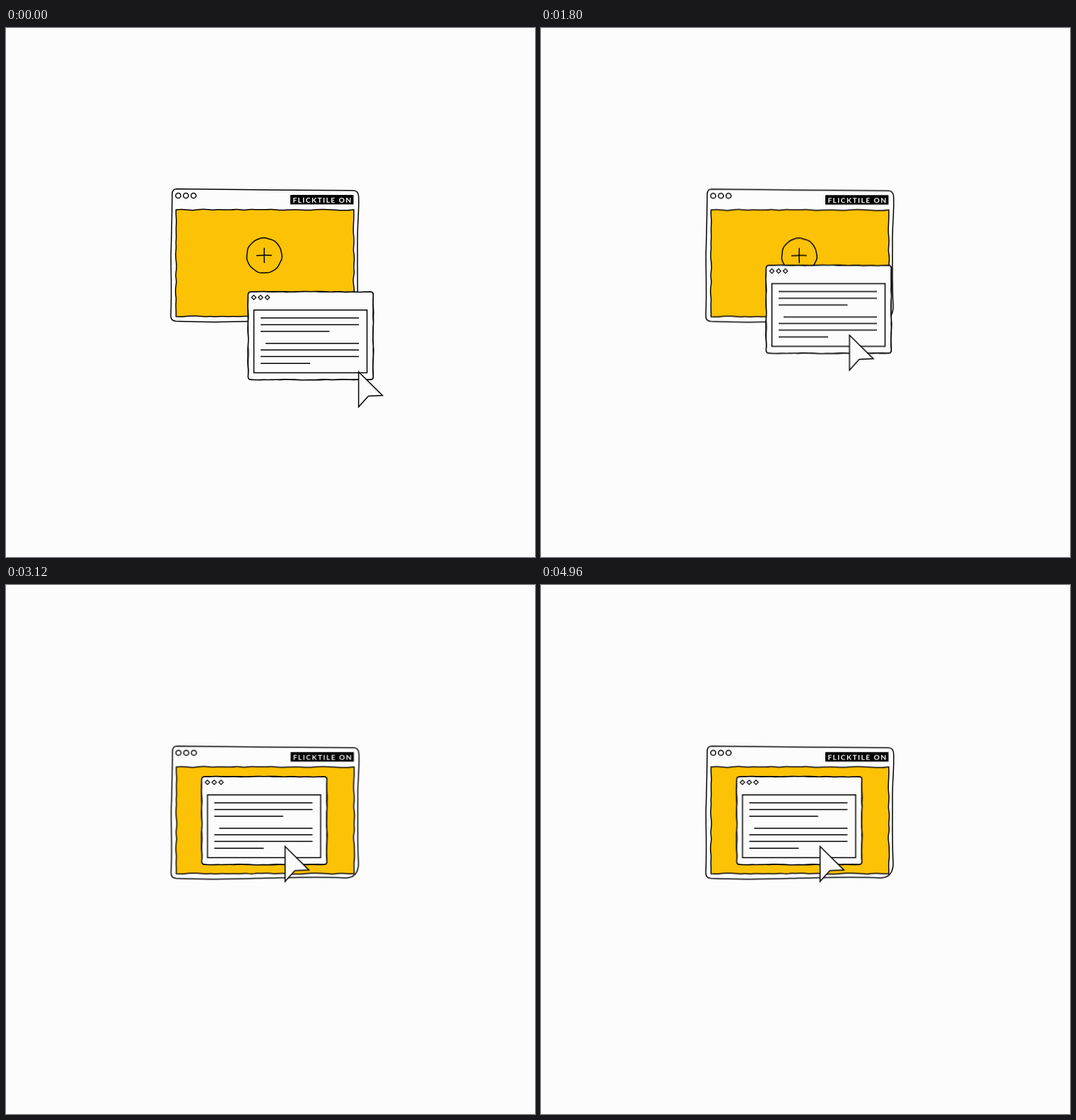
Write an HTML page that moves like this. It is 748x748 px and loops after 5000 ms.

```html
<!DOCTYPE html>
<html lang="en">
<head>
<meta charset="utf-8">
<title>Window drop</title>
<style>
  html, body { margin: 0; width: 100%; height: 100%; overflow: hidden; background: #fcfcfc; }
  svg { display: block; width: 100vw; height: 100vh; }
  .line { fill: none; stroke: #000; stroke-width: 1.5; }
  .paper { fill: #fcfcfc; }
  .thin { stroke-width: 1.2; }
  .tag { font: 700 10.3px Lato, sans-serif; letter-spacing: 1.4px; fill: #fff; }

  .sway, .drag, .reach { animation: 5s linear infinite; }
  .sway { animation-name: sway; }
  .drag { animation-name: drag; }
  .reach { animation-name: reach; }

  @keyframes sway {
    0%, 18.4% { transform: translate(0, 0); }
    36% { transform: translate(0, .3px); }
    46.4% { transform: translate(0, -.2px); }
    62.4% { transform: translate(.4px, .3px); }
    84.8%, 100% { transform: translate(0, .3px); }
  }
  @keyframes drag {
    0%, 33.6% { transform: translate(0, 0); animation-timing-function: cubic-bezier(.3, 1, .6, 1); }
    52.6%, 100% { transform: translate(-65.6px, -102px); }
  }
  @keyframes reach {
    0%, 18.4% { transform: translate(0, 0); animation-timing-function: cubic-bezier(.333, 1, .667, 1); }
    33.6%, 100% { transform: translate(-38.4px, -14.6px); }
  }
</style>
</head>
<body>
<svg viewBox="0 0 748 748">
  <g class="sway">
    <path class="line paper" d="M235 235Q235 228 241 227.6C320 228.2 410 229.8 491 229.7Q498.2 230 498.6 238C499.5 262 496.6 275 497 305C497 345 496.5 365 498 394Q497.5 413.5 480 414C440 411.5 400 413.5 365 414.2C325 415.5 295 417 240 414.6Q232.6 414 233 406C234.6 370 232.8 340 233.3 315C234.4 285 234.6 262 235 235Z"/>
    <g class="line">
      <circle cx="243.5" cy="237" r="3.6"/>
      <circle cx="254.4" cy="237" r="3.6"/>
      <circle cx="265.2" cy="237" r="3.6"/>
    </g>
    <rect x="402" y="236" width="89.4" height="13.4"/>
    <text class="tag" x="405.4" y="246.5">FLICKTILE ON</text>
    <path id="panel" class="line" style="fill:#fcc206"/>
    <path id="ring" class="line"/>
    <path class="line" d="M354 321.8Q365 321 375.8 321.4M365.2 310.8Q364.8 321 365.3 332.2"/>
  </g>
  <g class="drag">
    <path id="card" class="line paper"/>
    <path id="cardEdge" class="line" style="stroke-width:1"/>
    <path class="line thin" d="M347.2 381l3.2-3.2 3.2 3.2-3.2 3.2zm9.6 0l3.2-3.2 3.2 3.2-3.2 3.2zm9.6 0l3.2-3.2 3.2 3.2-3.2 3.2z"/>
    <path class="line" d="M350.5 398.8h160v88.6h-160z"/>
    <path class="line" d="M360 410h139M360 419.4h139M360 429h97.5M367 445.9h132M360 455.3h139M360 464.6h139M360 474.2h70"/>
    <g class="reach">
      <path class="line paper" d="M498.6 486.2L532.4 519.6 512.4 520.4 498.6 535.8Z"/>
    </g>
  </g>
</svg>
<script>
  function seeded(s) {
    return () => (s = s * 16807 % 2147483647) / 2147483647 - .5;
  }

  // Smooth curve through the midpoints of a wobbling edge.
  function edge(x1, y1, x2, y2, amp, rnd) {
    const len = Math.hypot(x2 - x1, y2 - y1);
    const n = Math.round(len / 8);
    const nx = (y2 - y1) / len, ny = (x1 - x2) / len;
    const pts = [];
    for (let i = 1; i < n; i++) {
      const u = (i + rnd() * .5) / n, d = rnd() * amp;
      pts.push([x1 + (x2 - x1) * u + nx * d, y1 + (y2 - y1) * u + ny * d]);
    }
    let path = '';
    pts.forEach(([x, y], i) => {
      const [ex, ey] = i < pts.length - 1
        ? [(x + pts[i + 1][0]) / 2, (y + pts[i + 1][1]) / 2]
        : [x2, y2];
      path += `Q${x.toFixed(2)} ${y.toFixed(2)} ${ex.toFixed(2)} ${ey.toFixed(2)}`;
    });
    return path;
  }

  function roughRect(l, t, r, b, rad, amp, seed) {
    const rnd = seeded(seed);
    return `M${l + rad} ${t}` + edge(l + rad, t, r - rad, t, amp, rnd)
      + `Q${r} ${t} ${r} ${t + rad}` + edge(r, t + rad, r, b - rad, amp, rnd)
      + `Q${r} ${b} ${r - rad} ${b}` + edge(r - rad, b, l + rad, b, amp, rnd)
      + `Q${l} ${b} ${l} ${b - rad}` + edge(l, b - rad, l, t + rad, amp, rnd)
      + `Q${l} ${t} ${l + rad} ${t}Z`;
  }

  function roughRing(cx, cy, r) {
    let path = '';
    for (let i = 0; i < 72; i++) {
      const a = i * Math.PI / 36;
      const d = r + .25 * Math.sin(7 * a + 1) + .2 * Math.sin(11 * a);
      path += `${i ? 'L' : 'M'}${(cx + d * Math.cos(a)).toFixed(2)} ${(cy + d * Math.sin(a)).toFixed(2)}`;
    }
    return path + 'Z';
  }

  const draw = (id, d) => document.getElementById(id).setAttribute('d', d);
  draw('panel', roughRect(240.4, 257, 491.8, 407.9, 0, 1.8, 4211));
  draw('ring', roughRing(365.2, 321.7, 24.8));
  draw('card', roughRect(342.3, 373, 519.4, 497.2, 4, 1.3, 907));
  draw('cardEdge', roughRect(342.4, 373.1, 519.3, 497.1, 4, 1.6, 5533));
</script>
</body>
</html>
```
